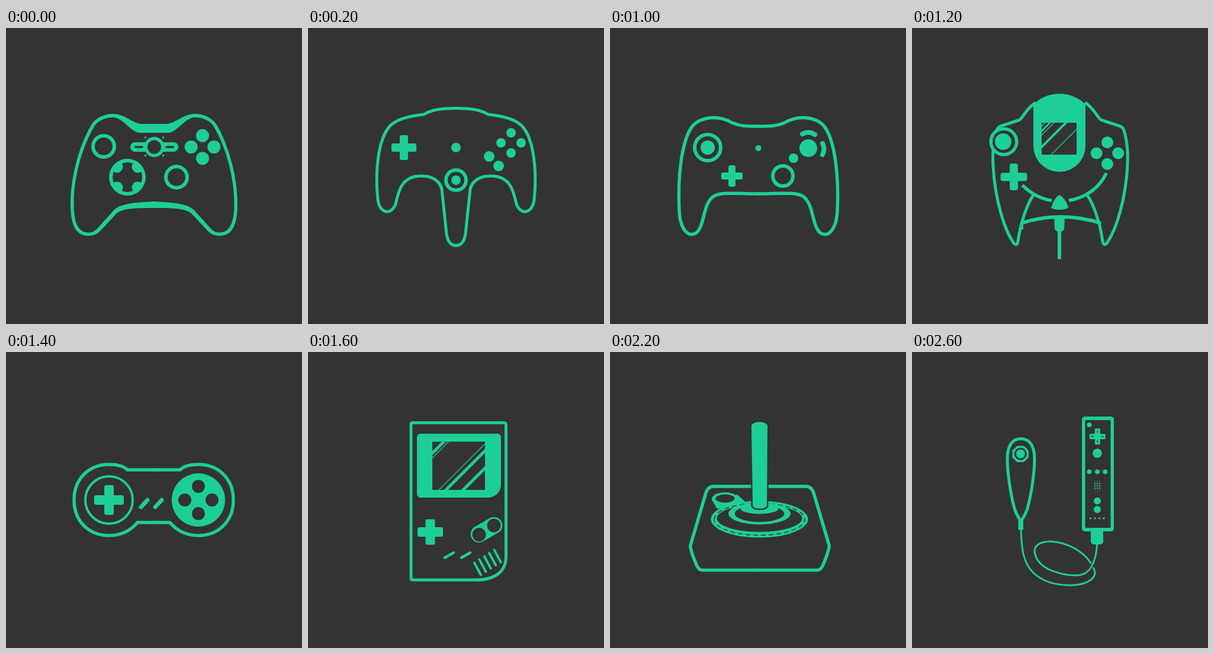
Recreate the animation shown at these times as an HTML page with a canvas. Size 500 px wide and 500 px high, loop 2.8 s.

```html
<!DOCTYPE html>
<html lang="en">
<head>
<meta charset="utf-8">
<title>Game controllers</title>
<style>
html, body { margin: 0; height: 100%; overflow: hidden; background: #333; }
canvas { display: block; width: 500px; height: 500px; }
</style>
</head>
<body>
<canvas id="stage" width="500" height="500"></canvas>
<script>
const ctx = document.getElementById('stage').getContext('2d');
const DARK = '#333333', GREEN = '#1dce98';
const STEP = 200;

const fill = (d, color = GREEN) => {
  ctx.fillStyle = color;
  ctx.fill(new Path2D(d));
};
const cut = d => fill(d, DARK);
const line = (d, width, color = GREEN, cap = 'round') => {
  ctx.strokeStyle = color;
  ctx.lineWidth = width;
  ctx.lineCap = cap;
  ctx.lineJoin = 'round';
  ctx.stroke(new Path2D(d));
};
const oval = (x, y, rx, ry, color = GREEN) => {
  ctx.fillStyle = color;
  ctx.beginPath();
  ctx.ellipse(x, y, rx, ry, 0, 0, 7);
  ctx.fill();
};
const dot = (x, y, r, color) => oval(x, y, r, r, color);
const ring = (x, y, r, width, color = GREEN) => {
  ctx.strokeStyle = color;
  ctx.lineWidth = width;
  ctx.beginPath();
  ctx.arc(x, y, r, 0, 7);
  ctx.stroke();
};
const box = (x, y, w, h, r, color = GREEN) => {
  ctx.fillStyle = color;
  ctx.beginPath();
  ctx.roundRect(x, y, w, h, r);
  ctx.fill();
};
const plus = (x, y, reach, arm, r, color) => {
  box(x - reach, y - arm / 2, reach * 2, arm, r, color);
  box(x - arm / 2, y - reach, arm, reach * 2, r, color);
};
const diamond = (x, y, gap, r, color) => {
  for (const [i, j] of [[0, -1], [-1, 0], [1, 0], [0, 1]]) dot(x + i * gap, y + j * gap, r, color);
};
const row = (y, r, xs, color) => xs.forEach(x => dot(x, y, r, color));
const both = (axis, draw) => {
  draw();
  ctx.save();
  ctx.translate(axis * 2, 0);
  ctx.scale(-1, 1);
  draw();
  ctx.restore();
};
const spin = (x, y, draw) => {
  for (let i = 0; i < 4; i++) {
    ctx.save();
    ctx.translate(x, y);
    ctx.rotate(i * Math.PI / 2);
    draw();
    ctx.restore();
  }
};
// Dark window with 45° reflections, each given as [x + y, width].
const glass = (x, y, w, h, r, stripes) => {
  box(x, y, w, h, r, DARK);
  ctx.save();
  ctx.beginPath();
  ctx.rect(x, y, w, h);
  ctx.clip();
  for (const [sum, width] of stripes) line(`M${sum - 500} 500L${sum} 0`, width);
  ctx.restore();
};

function hornedPad() {
  both(250, () => {
    fill('M250 162H228C214 161 200 145 181 145C167 145 153 151 145 162C125 195 109 250 109 296C109 325 114 351 139 351C148 351 154 348 159 343L186 314C196 305 212 304 250 304Z');
    cut('M250 177H226C212 177 197 151 181 151C170 151 157 155 150 165C130 197 114.500 250 114.500 296C114.500 325 120 345.500 139 345.500C146 345.500 150 343 154 339L181 309C192 297 212 295 250 293Z');
  });
  ring(165, 200, 18, 6);
  ring(288, 252, 18, 6);
  dot(205, 252, 31);
  dot(205, 252, 25, DARK);
  ctx.save();
  ctx.beginPath();
  ctx.arc(205, 252, 28, 0, 7);
  ctx.clip();
  spin(205, 252, () => dot(17.5, 17.5, 10));
  ctx.restore();
  diamond(332, 201, 19.3, 11);
  box(210, 193, 81, 16, 8);
  both(250.5, () => {
    line('M218.500 201H230', 3.5, DARK);
    row(185, 1.7, [235.5]);
    row(215.5, 1.7, [235.5]);
  });
  dot(250.5, 201, 17);
  dot(250.5, 201, 11.5, DARK);
}

function tridentPad() {
  both(250, () => line('M250 135.500C225 135.500 207 138 196 146C176 148 152 152 139 165C118 187 113 243 118 290C121 315 142 316 148 297C154 270 160 256 180 251C206 247 222 256 226 272L234 348C236 361 242 367.500 250 367.500', 5));
  plus(162, 202, 21, 14, 3);
  ring(250, 257, 17, 6);
  dot(250, 257, 8);
  dot(250, 202, 8);
  diamond(343, 194, 17, 8);
  dot(306, 217, 9);
  dot(322, 233, 9);
}

function touchPad() {
  both(250, () => {
    line('M250 164H212C200 157 164 156 150 163C128 176 110 258 110 308C111 342 138 346 150 327L175 288C184 276 207 281 250 281', 5.5);
    ring(207, 250, 18, 6);
  });
  box(204, 166, 92, 52, 6);
  spin(160, 206, () => fill('M-8-20q0-3 3-3h10q3 0 3 3v8l-8 8l-8-8z'));
  diamond(340, 206, 18, 10);
  dot(250, 250, 5);
}

function twinStickPad() {
  both(250.5, () => {
    fill('M190 179C198 184 215 184 251 184V272C243 272 245 274 241 281L215 250Z');
    dot(209.5, 265, 36.5);
    dot(209.5, 265, 31, DARK);
    dot(168, 218, 43, DARK);
    cut('M168 218L210 240L185 287L140 330L115 300Z');
    line('M186 288L164 322C155 336 148 337 141 337C122 337 109.500 322 110.500 304L122 215C124 200 133 187 143 183C150 178 147 170 151 165C156 161 165 161 174 161C190 161 189 168 190 174C191 183 197 186 206 186', 5.5);
    ring(209.5, 265, 18.5, 6);
    line('M224 217H241', 2.5, DARK);
  });
  spin(168, 218.500, () => fill('M-9.500-22q0-3.500 3.500-3.500h12q3.500 0 3.500 3.500v8q0 2-2 4l-4.500 4.500q-3 2-6 0l-4.500-4.500q-2-2-2-4z'));
  diamond(333.5, 218, 21, 12.5);
  row(190.5, 1.5, [239.5, 246.5, 253.5, 260.5], DARK);
}

function brickPad() {
  box(112, 190, 275, 120, 6);
  box(117, 195, 265, 110, 3, DARK);
  box(126, 213, 248, 83, 4);
  plus(160, 255, 22, 15, 2, DARK);
  box(206, 247, 75, 24, 5, DARK);
  line('M217 259H233M254 259H270', 7);
  for (const x of [309, 346]) {
    box(x - 16, 239, 32, 32, 4, DARK);
    dot(x, 255, 12);
  }
}

function wingPad() {
  both(250.5, () => line('M251 166C230 166 220 166 206 160C184 147 154 149 139 166C121 190 114 250 117 310C119 342 134 356 147 345C160 332 157 298 174 285C187 276 211 280 251 280', 5.5));
  ring(165, 202, 22, 6);
  dot(165, 202, 12);
  plus(206, 250, 18, 12, 3);
  ring(292, 250, 17, 6);
  dot(335, 203, 15);
  dot(310, 220, 8);
  line('M325 179Q335 173 346 180M359 195Q364 204 359 214', 8);
  dot(250.5, 203, 5);
}

function pronged() {
  both(250.5, () => {
    line('M207 127C190 140 188 152 181 155.500L152 165C144 167 143 172 141 180C136 200 136 215 137 232C140 290 156 340 171 362C175 368 178 366 179 360C183 330 195 295 206 281', 5);
  });
  line('M187 329Q250 309 317 329', 6);
  line('M186 331V339', 4);
  line('M186.500 265.500Q208 287 236 291.500M265 291.500Q310 283 328.500 245', 5.5, GREEN, 'butt');
  fill('M205 129Q224 111 249 111Q274 111 293 129V199A44 44 0 0 1 205 199Z');
  glass(219, 160, 59, 54, 2, [[385, 1.5], [393, 3], [400, 1.5], [420, 4], [449, 1.3]]);
  dot(155, 192, 24.5, GREEN);
  dot(155, 192, 19, DARK);
  dot(154, 192, 14);
  plus(172, 251.5, 22.5, 14, 4);
  diamond(330, 211.5, 18.3, 10);
  fill('M249 282C255 284 263 296 264 304C255 308 243 308 235 304C237 296 243 284 249 282Z');
  fill('M240 318H258L257 339Q256 343 252 344V390.500H246V344Q242 343 241 339Z');
}

function bonePad() {
  both(249.5, () => line('M250 199H205C198 192 188 190 174 190C139 190 115 215 115 250C115 285 139 310 174 310C197 310 211 301 222 288H250', 5.5));
  ring(174, 250, 40, 4);
  plus(174, 250, 25, 16, 3);
  dot(325, 250, 45);
  diamond(325, 250, 23, 11, DARK);
  line('M228 262L239 250M252 262L263 250', 7);
}

function pocketBrick() {
  line('M177 119.500H331q3.500 0 3.500 3.500V345C334.500 372 315 385 283 385H177q-3 0-3-3V122.500q0-3 3-3', 5);
  box(184, 138, 142, 108, [6, 6, 22, 6]);
  glass(210, 151.500, 89, 81.5, 1, [[381, 5], [389, 1.3], [454, 1.3], [466, 5], [495, 5]]);
  plus(206.5, 304, 21.5, 16, 3);
  line('M289 307.500L314 293', 28.5);
  dot(289, 308.5, 11.5, DARK);
  dot(314, 293, 11.5, DARK);
  line('M231 347.500L246 339M259 347.500L274 339', 4.5);
  for (let i = 0; i < 5; i++) line(`M${281 + i * 8.4} ${356 - i * 5.4}l11 20.500`, 4);
}

function widePocket() {
  box(114, 192, 274, 116, 50);
  glass(174, 205, 154, 90, 2, [[395, 4], [440, 1.3], [480, 5], [550, 1.3]]);
  plus(146, 236, 15, 10, 2, DARK);
  ring(146, 273, 9, 3.5, DARK);
  diamond(357, 238, 13, 6, DARK);
  line('M222 301H232M246 301H256M270 301H280', 3, DARK);
}

function tabletPad() {
  box(109, 174, 287, 154, 43);
  glass(175, 203.5, 155, 96, 2, [[396, 4], [437, 1.3], [446, 4.5], [486, 1.3], [511, 5], [581, 1.3]]);
  box(210, 180.5, 84, 12.5, 6, DARK);
  dot(252, 186.7, 4);
  ring(136, 210, 13.5, 3.5, DARK);
  ring(369.5, 210, 13.5, 3.5, DARK);
  plus(149, 244, 14, 9, 1, DARK);
  spin(149, 244, () => line('M0-10V-6', 1.3, GREEN, 'butt'));
  diamond(358.2, 244, 12.3, 6, DARK);
  dot(345, 273, 4.5, DARK);
  dot(345, 288, 4.5, DARK);
  dot(252, 313, 7, DARK);
  line('M158 313H163.500M342.500 313H347.500', 3, DARK);
  box(305.5, 310, 8, 8, 1.5, DARK);
  dot(325, 313.7, 4, DARK);
}

function joystick() {
  both(253, () => line('M253 227H175C168 227 164 232 162 238L136 326C135 331 140 345 145 357C148 365 151 368.500 155 368.500H253', 5.5));
  fill('M172 249L181 265L234 258L215 241Z');
  oval(194, 248.5, 22, 11.5);
  oval(194.5, 247.5, 16, 7, DARK);
  oval(252.5, 282.5, 82, 31);
  oval(252.5, 281, 72, 23, DARK);
  ctx.save();
  ctx.setLineDash([8, 5]);
  line('M176 282.500a76.500 27 0 1 1 153 0a76.500 27 0 1 1-153 0', 1.4, DARK, 'butt');
  ctx.restore();
  oval(252.5, 273, 52.5, 18.5);
  oval(252.5, 273, 42, 14, DARK);
  oval(252.5, 264.5, 32, 9);
  const shaft = 'M239 125C239 116 266 116 266 125L265 260C263 266 243 266 241 260Z';
  line(shaft, 5, DARK);
  fill(shaft);
}

function slimPocket() {
  box(169, 112, 163, 278, [10, 10, 26, 26]);
  box(174, 117, 153, 268, [6, 6, 21, 21], DARK);
  box(184, 128, 133, 118, [6, 6, 20, 20]);
  glass(203, 143, 95, 82, 2, [[370, 4], [382, 1.3], [448, 5], [470, 1.3]]);
  plus(206, 295, 20, 14, 3);
  dot(302, 286, 12);
  dot(272, 300, 12);
  line('M228 344H240M259 344H271', 5);
  for (let i = 0; i < 3; i++) row(350 + i * 8, 2, [290, 298, 306]);
}

function wandPair() {
  line('M184 298C185 332 187 355 205 373C222 389 245 394.500 270 394C297 393 313 381 308 368L306.500 365', 3);
  line('M313 322C311 352 303 373 285 376.500C262 380 218 370 209 345C202 328 215 320 235 320C265 322 290 338 302 356.500', 3);
  both(184, () => line('M184 146.500C168 146.500 161 161 161 180C161 205 167 243 173 264C176 274 180 280 184 286', 5));
  box(179.5, 283, 8.5, 17.5, 1.5);
  fill('M177.500 158.500L189 158.500L197 166.500V178L189 186H177.500L169.500 178V166.500Z');
  dot(183.3, 172.2, 10.5, DARK);
  dot(183.3, 172, 7.5);
  box(287, 109, 54, 194, 5);
  box(292.5, 115, 43, 182, 1.5, DARK);
  box(302, 300, 21, 25, [0, 0, 5, 5]);
  dot(299.5, 123, 4);
  plus(313.3, 142.7, 13.5, 9, 1);
  spin(313.3, 142.7, () => line('M0-10.500V-6', 1.3, DARK, 'butt'));
  dot(313, 171, 7.8);
  row(202.3, 4, [299.5, 313, 326.3]);
  for (let i = 0; i < 5; i++) row(218 + i * 4, i % 4 ? 1.2 : 0.7, [309, 313, 317]);
  dot(313, 251.5, 6);
  dot(313, 266, 6);
  row(281, 1.7, [301.5, 309, 316.5, 324]);
}

const scenes = [
  hornedPad, tridentPad, touchPad, twinStickPad, brickPad, wingPad, pronged,
  bonePad, pocketBrick, widePocket, tabletPad, joystick, slimPocket, wandPair
];

function render() {
  ctx.fillStyle = DARK;
  ctx.fillRect(0, 0, 500, 500);
  scenes[Math.floor(performance.now() / STEP) % scenes.length]();
  requestAnimationFrame(render);
}
render();
</script>
</body>
</html>
```
